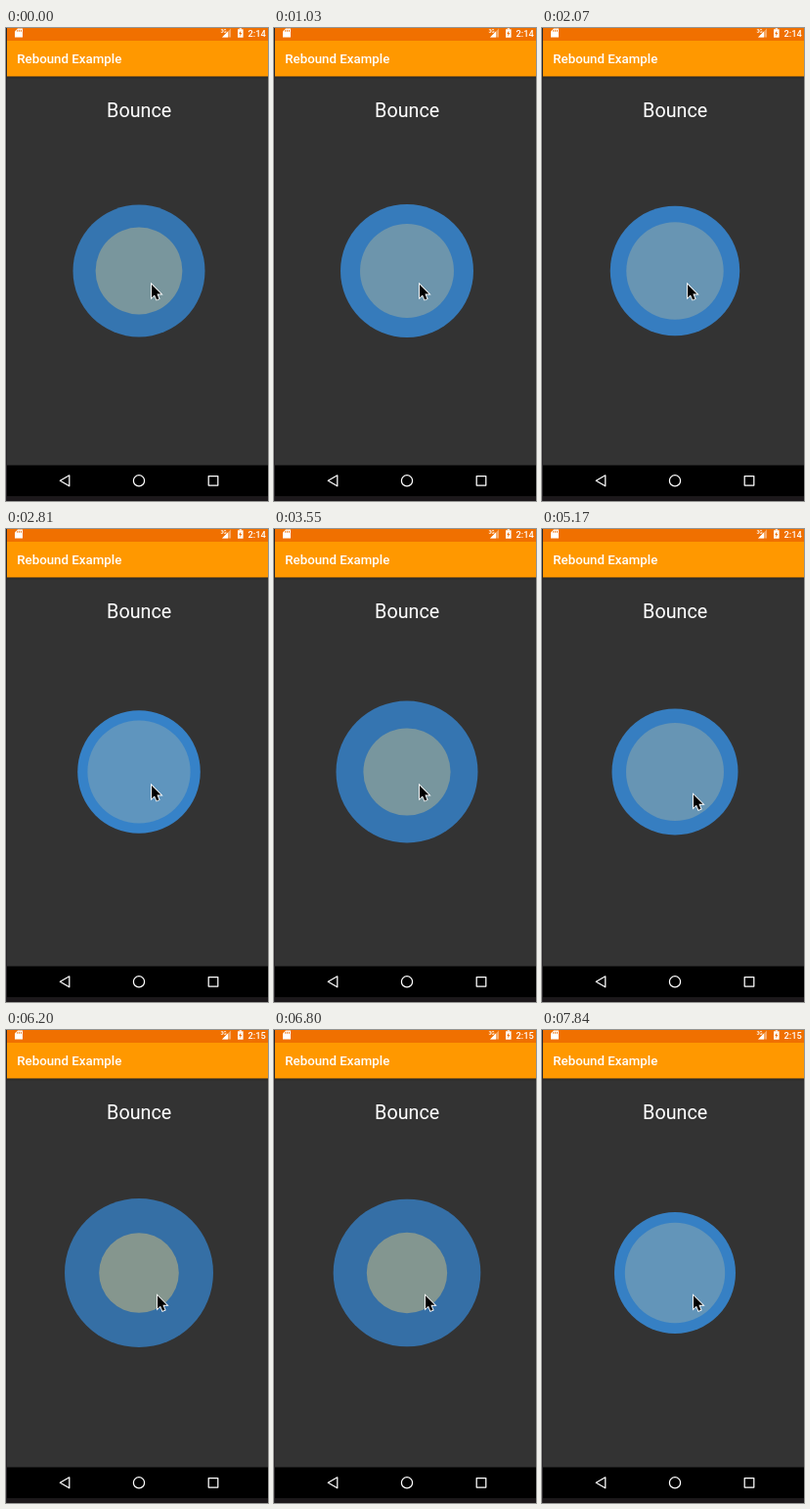
An HTML page with a canvas that plays this animation: 268 by 483 pixels, repeating every 7.99 s.

```html
<!DOCTYPE html>
<html lang="en">
<head>
<meta charset="utf-8">
<title>Spring bounce</title>
<style>
html, body { margin: 0; width: 100%; height: 100%; overflow: hidden; background: #333; }
canvas { display: block; width: 268px; height: 483px; }
</style>
</head>
<body>
<canvas></canvas>
<script>
const W = 268, H = 483, LOOP = 7990, STEP = 147.9, LAST = 53;
const ORANGE = '#f07000';
const canvas = document.querySelector('canvas');
const ctx = canvas.getContext('2d');
const dpr = window.devicePixelRatio || 1;
canvas.width = W * dpr;
canvas.height = H * dpr;
ctx.scale(dpr, dpr);

// Key poses: step, ring radius, core radius
const poses = [
  [0, 67.5, 44.4], [7, 68, 48], [19, 62.8, 52.6], [24, 72.5, 44.6],
  [35, 64.5, 50], [42, 76, 40.8], [LAST, 62, 51.2]
];

const clamp = v => Math.max(0, Math.min(1, v));
const lerp = (a, b, k) => a + (b - a) * k;
const ease = k => (1 - Math.cos(Math.PI * k)) / 2;
const mix = (a, b, k) => `rgb(${a.map((v, i) => Math.round(lerp(v, b[i], k)))})`;

// Between poses the ring pulses about every six steps; the core shrinks as it grows
function pose(step) {
  const n = Math.max(1, poses.findIndex(p => p[0] >= step));
  const [from, ringA, coreA] = poses[n - 1];
  const [to, ringB, coreB] = poses[n];
  const k = (step - from) / (to - from);
  const pulses = Math.round((to - from) / 6);
  const swing = 6 * Math.sin(Math.PI * pulses * k) ** 2;
  return {
    ring: lerp(ringA, ringB, ease(k)) + swing,
    core: lerp(coreA, coreB, ease(k)) - 0.78 * swing
  };
}

function rect(x, y, w, h, color) {
  ctx.fillStyle = color;
  ctx.fillRect(x, y, w, h);
}

function circle(x, y, r) {
  ctx.beginPath();
  ctx.arc(x, y, r, 0, Math.PI * 2);
}

function disc(r, color) {
  circle(136, 248, r);
  ctx.fillStyle = color;
  ctx.fill();
}

const fillPath = (d, color) => {
  ctx.fillStyle = color;
  ctx.fill(new Path2D(d));
};

function text(str, x, y, size, weight = 400, align = 'left') {
  ctx.font = `${weight} ${size}px Roboto, sans-serif`;
  ctx.textAlign = align;
  ctx.fillStyle = '#fff';
  ctx.fillText(str, x, y);
}

function statusBar(clock) {
  rect(0, 0, W, 13, ORANGE);
  fillPath('M12 .5h5v9h-8v-6z', '#fff');
  for (let x = 11.3; x < 16; x += 1.9) rect(x, 1.8, 0.9, 2, ORANGE);

  fillPath('M230 .5v9h-9z', 'rgba(255,255,255,.4)');
  fillPath('M227 3.5v6h-6z', '#fff');
  text('3G', 219.5, 4.5, 5, 500);

  rect(237, 1.3, 5.6, 8.4, '#fff');
  rect(238.6, 0.3, 2.4, 1.2, '#fff');
  fillPath('M240.4 2.4l-2.2 3.6h1.3l-.3 2.6 2.2-3.6h-1.3z', ORANGE);
  text(clock, 247.4, 9.2, 9.3, 500);
}

function toolbar() {
  rect(0, 13, W, 36.5, '#ff9800');
  const shade = ctx.createLinearGradient(0, 49.5, 0, 52.5);
  shade.addColorStop(0, 'rgba(0,0,0,.25)');
  shade.addColorStop(1, 'rgba(0,0,0,0)');
  rect(0, 49.5, W, 3, shade);
  text('Rebound Example', 11.2, 36.4, 13.3, 500);
}

function navBar() {
  rect(0, 446.5, W, 32, '#000');
  rect(0, 478.5, W, 4.5, '#1c181b');
  ctx.strokeStyle = '#fff';
  ctx.lineWidth = 1.25;
  ctx.lineJoin = 'round';
  ctx.stroke(new Path2D('M55.3 462.3l9.5-5.5v11z'));
  circle(136, 462.3, 5.6);
  ctx.stroke();
  ctx.strokeRect(207.2, 457.5, 9.6, 9.6);
}

function cursor(x, y) {
  const arrow = new Path2D('M0 0V13.2L3 10.4 5.2 15.4 7.5 14.4 5.4 9.5H9.5z');
  ctx.save();
  ctx.translate(x, y);
  ctx.lineJoin = 'miter';
  ctx.lineWidth = 1.8;
  ctx.strokeStyle = '#fff';
  ctx.stroke(arrow);
  ctx.fillStyle = '#000';
  ctx.fill(arrow);
  ctx.restore();
}

function draw(ms) {
  const step = Math.min(LAST, Math.floor((ms + 16) / STEP));
  const { ring, core } = pose(step);
  const tint = (core - 41) / 11.5;
  const move = ease(clamp((step - 27) / 3));

  rect(0, 0, W, H, '#333');
  statusBar(step < 42 ? '2:14' : '2:15');
  toolbar();
  text('Bounce', 136.2, 90.8, 19.75, 400, 'center');
  disc(ring, mix([53, 111, 166], [54, 130, 200], tint));
  disc(core, mix([132, 150, 143], [95, 149, 190], tint));
  navBar();
  rect(0, 0, 1, H, '#29262a');
  cursor(lerp(149, 155, move), lerp(262, 271.3, move));
}

function tick() {
  draw(performance.now() % LOOP);
  requestAnimationFrame(tick);
}
tick();
</script>
</body>
</html>
```
